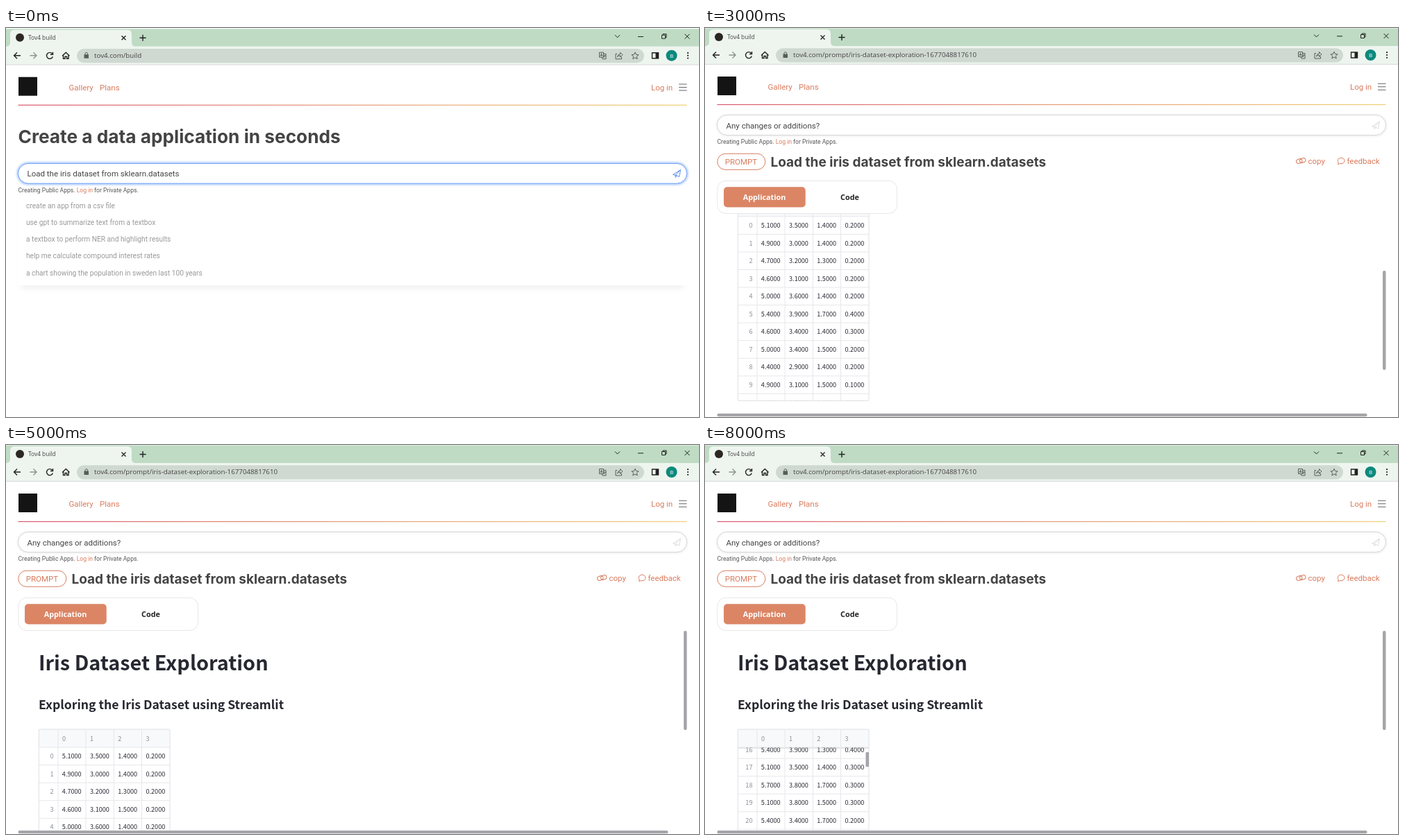
Write an HTML page that moves like this. It is 998 px wide and 561 px high and loops after 9 s.

```html
<!DOCTYPE html>
<html lang="en">
<head>
<meta charset="utf-8">
<title>Create a data application</title>
<style>
  html, body { margin: 0; width: 100%; height: 100%; overflow: hidden; background: #fff; }
  svg { display: block; }
  text { font: 11.5px Roboto, sans-serif; fill: #444; white-space: pre; }
  .line { fill: none; stroke: #222; stroke-width: 1.4; }
  .thin { stroke: #555f58; stroke-width: 1; }
  .chrome { font-family: "Open Sans", sans-serif; }
  .link { fill: #d87c5e; }
  .coral { fill: none; stroke: #d87c5e; }
  .small { font-size: 8.6px; fill: #555; }
  .title { font: 700 19px Inter, sans-serif; fill: #444; }
  .tab { font: 700 10.8px "Open Sans", sans-serif; fill: #222; text-anchor: middle; }
  .doc text { font-family: "Noto Sans CJK SC", "Noto Sans CJK JP", "Noto Sans CJK", "Noto Sans", sans-serif; fill: #262730; }
  .doc .cell { font-size: 9.15px; text-anchor: end; }
  .doc .dim { fill: #8a8d99; }
  .grid { fill: none; stroke: #e6e7eb; }
  .bar { fill: #a5a5a9; }
</style>
</head>
<body>
<svg width="998" height="561" viewBox="0 0 998 561">
  <defs>
    <linearGradient id="rule"><stop stop-color="#d8566c"/><stop offset=".5" stop-color="#e59a78"/><stop offset="1" stop-color="#efcf75"/></linearGradient>
    <filter id="glow" x="-5%" y="-50%" width="110%" height="200%"><feGaussianBlur stdDeviation="1.4"/></filter>
    <filter id="soft" x="-5%" y="-20%" width="110%" height="140%"><feGaussianBlur stdDeviation="5"/></filter>
    <clipPath id="view"><path d="M0 268H970V556H0z"/></clipPath>
    <clipPath id="body"><path d="M47 436H236V701.8H47z"/></clipPath>
    <path id="plane" d="M-5.5 1.5L5.5-5.5 3.5 4.5 0 2.8-2 5.5V2.2L5.5-5.5M-5.5 1.5L-2 2.2M0 2.8L-2 2.2"/>
    <g id="caption"><text class="small" x="17.5">Creating Public Apps. <tspan class="link">Log in</tspan> for Private Apps.</text></g>
  </defs>

  <g id="page">
    <!-- browser window -->
    <path fill="#bfdbc4" d="M0 .5H998V26H0z"/>
    <path fill="#eef5ef" d="M0 26Q6 26 6 20V8Q6 2 12 2H175Q181 2 181 8V20Q181 26 187 26H998V52H0z"/>
    <path d="M0 52.3H998" stroke="#d3d8d4"/>
    <circle cx="20" cy="13" r="6" fill="#2c2722"/>
    <text class="chrome" x="32" y="16" style="font-size:8.4px">Tov4 build</text>
    <path class="line" d="M166.5 10.5l6 6m0-6l-6 6M192.5 13.5h9m-4.5-4.5v9"/>
    <path class="line" style="stroke-width:1" d="M877 9.5l3.5 3.5 3.5-3.5M910 11.8h8M944.5 9.5h5v5h-5zM946 9.5v-1.5h5v5h-1.5M977.5 8l7 7m0-7l-7 7"/>
    <path class="line" d="M21 39H11.5m4.5-4.5L11.5 39l4.5 4.5M66.5 36.3A4.5 4.5 0 1 0 67.3 40.5M67.5 34v3.5H64M81 39.5L86.3 34.5 91.5 39.5M82.5 38.5V43.5H85V40.5H87.6V43.5H90V38.5"/>
    <path class="line" style="stroke:#8b948d" d="M34.5 39H44m-4.5-4.5L44 39l-4.5 4.5"/>
    <rect x="102" y="29.3" width="817" height="20.2" rx="10.1" fill="#d0d8d2"/>
    <path fill="#555f58" d="M112.5 37.5h6.5v5.5h-6.5z"/>
    <path class="line thin" d="M114 38v-1.5a1.8 1.8 0 0 1 3.6 0V38"/>
    <text class="chrome" id="url" x="127" y="42.3" style="font-size:9.75px"></text>
    <path class="line thin" d="M854.5 34.5h6v7h-6zM860.5 36.5h3.5v7.5h-5l-1-2.5M856 40l1.5-4 1.5 4m-2.5-1h2M861 39h2.5m-.5 0l-2 3"/>
    <path class="line thin" d="M880 36.5h-2v7.5h8.5v-3M880.5 41q.5-4 4-4v-2.5l3.5 3.5-3.5 3.5v-2.5q-2.5 0-4 2z"/>
    <path class="line thin" d="M906 34.2l1.5 3.4 3.6.3-2.8 2.4.9 3.6-3.2-1.9-3.2 1.9.9-3.6-2.8-2.4 3.6-.3z"/>
    <path class="line" d="M930.5 35h9v8h-9z"/><path fill="#222" d="M935.5 35h4v8h-4z"/>
    <circle cx="958.5" cy="39" r="8" fill="#0d897d"/>
    <text class="chrome" x="958.5" y="42" text-anchor="middle" style="font-size:8px;fill:#fff">B</text>
    <g fill="#222"><circle cx="982" cy="35.2" r="1.1"/><circle cx="982" cy="39" r="1.1"/><circle cx="982" cy="42.8" r="1.1"/></g>

    <!-- site header -->
    <rect x="18" y="70" width="27" height="27" fill="#141414"/>
    <text class="link" x="90.5" y="89.3">Gallery</text>
    <text class="link" x="135" y="89.3">Plans</text>
    <text class="link" x="929" y="89.3">Log in</text>
    <path class="line" style="stroke:#666;stroke-width:1.1" d="M969 80.3h11.5M969 84.8h11.5M969 89.3h11.5"/>
    <rect x="17.5" y="109.9" width="963" height="1.2" fill="url(#rule)"/>

    <!-- start screen -->
    <g id="start">
      <text class="title" x="17.5" y="165.3" style="font-size:26.25px">Create a data application in seconds</text>
      <rect x="22" y="244" width="954" height="131" opacity=".06" filter="url(#soft)"/>
      <path fill="#fff" d="M17.5 226H980.5V370.5H17.5z"/>
      <rect x="17.5" y="194.7" width="963" height="28.8" rx="14.4" fill="none" stroke="#a9c8fc" stroke-width="4" filter="url(#glow)"/>
      <rect x="17.5" y="194.7" width="963" height="28.8" rx="14.4" fill="#fff" stroke="#6f9ff2"/>
      <text x="30.5" y="212.9">Load the iris dataset from sklearn.datasets</text>
      <use href="#plane" x="966" y="209.3" fill="none" stroke="#5b8fec"/>
      <use href="#caption" y="236.2"/>
      <g id="ideas"></g>
    </g>

    <!-- result screen -->
    <g id="result">
      <rect x="17.5" y="126" width="963" height="29" rx="14.5" fill="none" stroke="#bbb" stroke-width="2" opacity=".35" filter="url(#glow)"/>
      <rect x="17.5" y="125.5" width="963" height="29" rx="14.5" fill="#fff" stroke="#d6d6d6"/>
      <text x="30.5" y="144.6">Any changes or additions?</text>
      <use href="#plane" x="966" y="140.5" fill="none" stroke="#ddd"/>
      <use href="#caption" y="167.3"/>
      <rect class="coral" x="17.8" y="181.3" width="69" height="23" rx="11.5"/>
      <text class="link" x="52" y="197.2" text-anchor="middle">PROMPT</text>
      <text class="title" x="94.5" y="199.7">Load the iris dataset from sklearn.datasets</text>
      <g class="coral">
        <rect x="851.5" y="189" width="8.5" height="6" rx="3" transform="rotate(-20 856 192)"/>
        <rect x="856.5" y="188" width="8.5" height="6" rx="3" transform="rotate(-20 861 191)"/>
        <path d="M911.5 196.5l.8-2.3a4.9 4.3 0 1 1 2.4 1.4z"/>
      </g>
      <text class="link" x="868.5" y="195.9">copy</text>
      <text class="link" x="924.5" y="195.9">feedback</text>
      <rect x="17.8" y="220.3" width="258.7" height="47.2" rx="12" fill="#fff" stroke="#e7e7e7"/>
      <rect x="27" y="229.3" width="117.7" height="29.2" rx="5" fill="#db8565"/>
      <text class="tab" x="85.5" y="248" style="fill:#fff">Application</text>
      <text class="tab" x="208.5" y="248">Code</text>

      <g class="doc" clip-path="url(#view)">
        <g id="doc">
          <text x="47" y="324.5" style="font-size:28.85px;font-weight:700">Iris Dataset Exploration</text>
          <text x="47" y="381" style="font-size:17.6px;font-weight:600">Exploring the Iris Dataset using Streamlit</text>
          <g clip-path="url(#body)"><g id="rows"></g></g>
          <path fill="#f8f9fb" d="M47 410H236V436H47z"/>
          <path id="shade" opacity=".1" d="M47 436H236V438H47z"/>
          <g id="heads"></g>
          <path class="grid" d="M47 436H236M75 410V701.8M115 410V701.8M155.3 410V701.8M195.5 410V701.8"/>
          <rect class="grid" x="47.3" y="410" width="188.7" height="291.8" rx="1" style="stroke:#dfe0e5"/>
          <rect class="bar" id="thumb" x="231.5" width="4.5" height="21" rx="1"/>
        </g>
      </g>
      <rect class="bar" id="scroll" x="976" width="4.5" height="143" rx="2"/>
      <rect class="bar" x="17.5" y="556" width="936" height="4.3" rx="2"/>
    </g>
  </g>
</svg>
<script>
const $ = id => document.getElementById(id);
const label = (cls, x, y, s) => `<text class="${cls}" x="${x}" y="${y}">${s}</text>`;
const move = (id, y) => $(id).setAttribute('transform', `translate(0 ${y})`);
const show = (id, on) => $(id).style.display = on ? '' : 'none';

const ROW = 25.56;
const iris = [
  [5.1, 3.5, 1.4, .2], [4.9, 3, 1.4, .2], [4.7, 3.2, 1.3, .2], [4.6, 3.1, 1.5, .2],
  [5, 3.6, 1.4, .2], [5.4, 3.9, 1.7, .4], [4.6, 3.4, 1.4, .3], [5, 3.4, 1.5, .2],
  [4.4, 2.9, 1.4, .2], [4.9, 3.1, 1.5, .1], [5.4, 3.7, 1.5, .2], [4.8, 3.4, 1.6, .2],
  [4.8, 3, 1.4, .1], [4.3, 3, 1.1, .1], [5.8, 4, 1.2, .2], [5.7, 4.4, 1.5, .4],
  [5.4, 3.9, 1.3, .4], [5.1, 3.5, 1.4, .3], [5.7, 3.8, 1.7, .3], [5.1, 3.8, 1.5, .3],
  [5.4, 3.4, 1.7, .2], [5.1, 3.7, 1.5, .4]
];
const ideas = [
  'create an app from a csv file',
  'use gpt to summarize text from a textbox',
  'a textbox to perform NER and highlight results',
  'help me calculate compound interest rates',
  'a chart showing the population in sweden last 100 years'
];

$('ideas').innerHTML = ideas.map((s, i) =>
  `<text x="29" y="${259.5 + 24.1 * i}" style="font-size:10.2px;fill:#999">${s}</text>`).join('');
$('heads').innerHTML = [0, 1, 2, 3].map(i => label('cell dim', 86 + 40.2 * i, 426.5, i)).join('');
$('rows').innerHTML = iris.map((row, i) => {
  const top = 436 + ROW * i, y = top + 16.2;
  return label('cell dim', 68.5, y, i) +
    row.map((v, c) => label('cell', 108.7 + 40.2 * c, y, v.toFixed(4))).join('') +
    `<path class="grid" d="M47 ${top + ROW}H236"/>`;
}).join('');

// One step per second: window offset, page scroll, table scroll
const steps = [
  [.7, 0, 0], [-.8, 0, 0], [0, 119.5, 0], [0, 164.2, 0], [.4, 164.2, 0],
  [0, 0, 0], [0, 0, 140.5], [0, 0, 279.5], [0, 0, 418.4]
];
let current = -1;

function draw(now) {
  const n = Math.floor(now / 1000) % steps.length;
  if (n === current) return;
  current = n;
  const [shift, outer, inner] = steps[n];
  move('page', shift);
  move('doc', -outer);
  move('rows', -inner);
  move('scroll', 268 + outer * .5);
  move('thumb', 410 + inner * .079);
  show('start', n === 0);
  show('result', n > 0);
  show('thumb', inner > 0);
  show('shade', inner > 0);
  $('url').textContent = 'tov4.com/' + (n ? 'prompt/iris-dataset-exploration-1677048817610' : 'build');
}
const start = performance.now();
function tick() {
  draw(performance.now() - start);
  requestAnimationFrame(tick);
}
tick();
</script>
</body>
</html>
```
